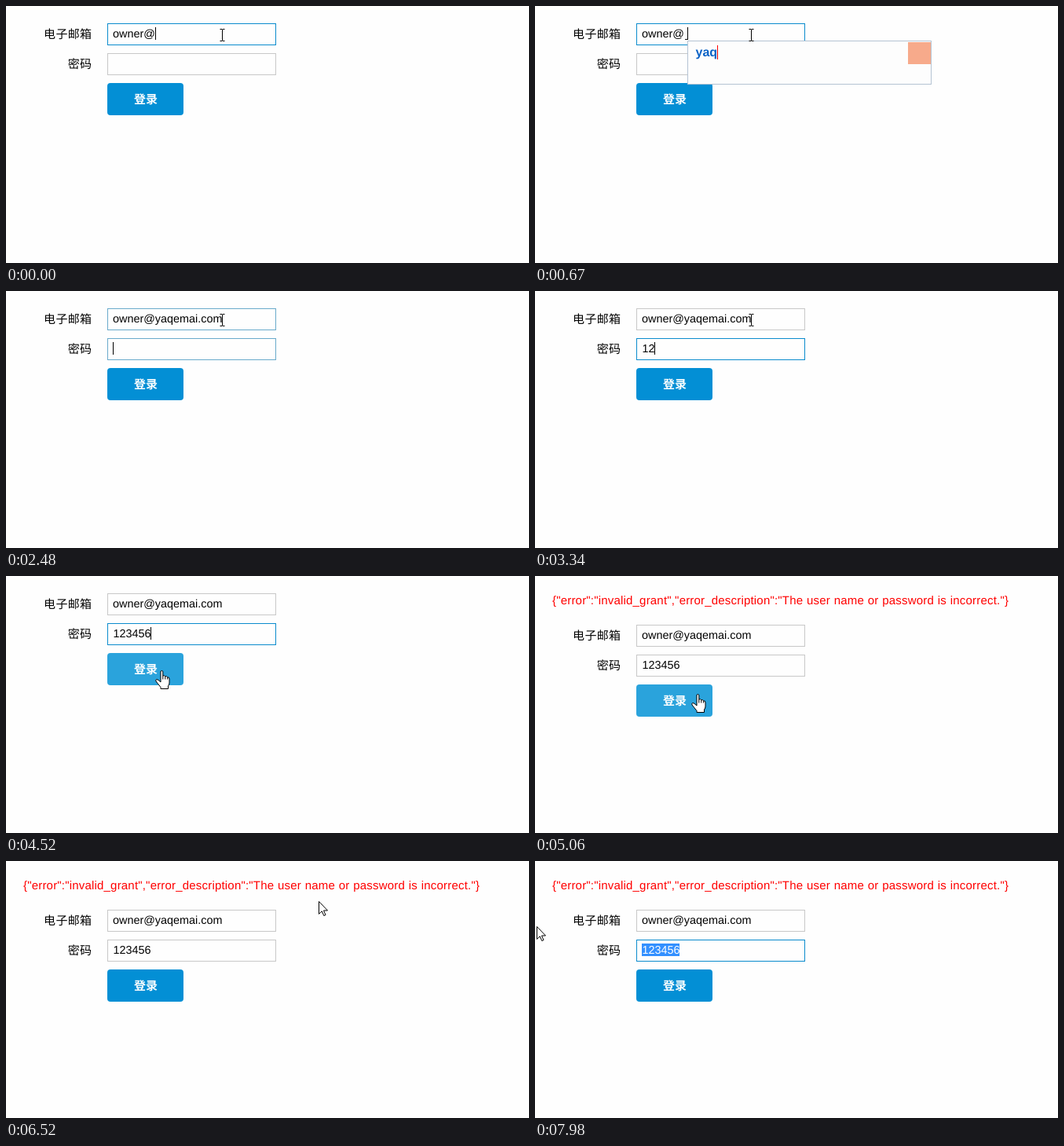
An HTML page that plays this animation: 666 by 327 pixels, repeating every 8000 ms.

```html
<!DOCTYPE html>
<html lang="zh-CN">
<head>
<meta charset="utf-8">
<title>登录</title>
<style>
html, body { margin: 0; width: 100%; height: 100%; overflow: hidden; background: #fefefe; }
svg { display: block; }
text {
  font-family: "Liberation Sans", Arial, sans-serif;
  font-kerning: none; text-rendering: geometricPrecision; white-space: pre;
}
.label { font: 15px "Noto Sans CJK SC", "Noto Sans CJK", sans-serif; letter-spacing: .3px; fill: #000; text-anchor: end; }
.value { font-size: 14.4px; fill: #000; }
.error { font-size: 15px; letter-spacing: .19px; word-spacing: .43px; fill: #f00; }
.typed { font-size: 16px; font-weight: bold; fill: #0a62c6; }
.submit { font: bold 15px "Noto Sans CJK SC", "Noto Sans CJK", sans-serif; fill: #fff; text-anchor: middle; }
.light { fill: #fff; }
.box { fill: #fefefe; stroke-width: 1; }
</style>
</head>
<body>
<svg width="666" height="327" viewBox="0 0 666 327">
  <defs>
    <clipPath id="picked"><rect id="pickClip" y="0" height="60" width="1"/></clipPath>
  </defs>
  <g id="error">
    <text class="error" x="22" y="36"></text>
    <rect id="errorSel" y="22" height="17" fill="#3390ff"/>
    <text class="error light" x="22" y="36" clip-path="url(#picked)"></text>
  </g>
  <g id="form">
    <text class="label" x="109.3" y="40.5">电子邮箱</text>
    <text class="label" x="109.3" y="78.5">密码</text>
    <rect id="mailBox" class="box" x="129.5" y="22.5" width="214" height="27"/>
    <rect id="passBox" class="box" x="129.5" y="60.5" width="214" height="27"/>
    <rect id="passSel" x="136" y="65" height="16" fill="#3390ff"/>
    <text id="mail" class="value" x="136" y="40"></text>
    <text id="pass" class="value" x="136.5" y="78"></text>
    <path id="dash" d="M191 42.5h4" stroke="#111"/>
    <rect id="caret" width="1" height="16" fill="#000"/>
    <rect id="button" x="129" y="98" width="97" height="41" rx="4"/>
    <text class="submit" x="178" y="124">登录</text>
  </g>
  <g id="popup">
    <rect x="194.5" y="44.5" width="310" height="55" fill="#fdfdfd" stroke="#b4c3d3"/>
    <rect x="475" y="46" width="29" height="28" fill="#f7aa8b"/>
    <text id="typed" class="typed" x="204.5" y="64"></text>
    <rect id="popCaret" y="50" width="1" height="18" fill="#f00"/>
  </g>
  <g id="mouse">
    <path id="beam" d="M-3 -7.5h2.5l.5 .5l.5-.5h2.5M0 -7V7M-3 7.5h2.5l.5-.5l.5 .5h2.5" fill="none" stroke="#000"/>
    <path id="arrow" d="M.5 .5V16.5L4.2 12.8L6.8 18.6L9 17.6L6.5 12H11.5Z" fill="#fff" stroke="#000"/>
    <g id="hand" stroke="#000">
      <path d="M0 2Q0 .5 1.4 .5Q2.8 .5 2.8 2V7Q5 6 5.8 7.8Q8 7 8.6 8.8Q11 8.4 11 11V16Q11 18 9.5 20V23.5H0V21.5L-6 14Q-7 12 -5 11.5Q-3.5 11.5 0 15Z" fill="#fff"/>
      <path d="M2.8 7V11.5M5.8 8V11.5M8.6 9V11.5" fill="none"/>
    </g>
  </g>
</svg>
<script>
const LOOP = 8000;
const USER = "owner@", HOST = "yaqemai.com", CODE = "123456";
const MESSAGE = '{"error":"invalid_grant","error_description":"The user name or password is incorrect."}';
const FIELD_EDGE = [200, 200, 200], FOCUS_EDGE = [10, 139, 205];
const BLUE = [3, 143, 213], HOVER = [42, 163, 220];

// [time, value...]: each row holds until the next one
const HOST_KEYS = [120, 400, 560, 710, 860, 1010, 1190, 1370, 1520, 2080, 2080];
const CODE_KEYS = [3340, 3340, 3610, 3730, 4010, 4130];
const MOUSE = [
  [0, 275, 37, "beam"], [4250, 258, 70, "beam"], [4400, 215, 104, "hand"], [4520, 197, 120, "hand"],
  [4790, 203, 165, "hand"], [4910, 206, 150, "hand"], [5210, 340, 112, "beam"],
  [5330, 520, 52, "arrow"], [5480, 612, 30, "arrow"], [5600, 430, 22, "beam"],
  [5720, 200, 20, "beam"], [5870, 100, 19, "beam"], [5990, 40, 19, "beam"],
  [6140, 26, 25, "beam"], [6290, 170, 33, "beam"], [6400, 320, 42, "arrow"],
  [6520, 398, 51, "arrow"], [6640, 385, 86, "arrow"], [6790, 335, 118, "beam"],
  [7070, 262, 136, "arrow"], [7220, 210, 144, "hand"], [7340, 195, 113, "beam"],
  [7460, 158, 112, "beam"], [7580, 118, 109, "arrow"], [7700, 70, 101, "arrow"],
  [7850, 26, 90, "arrow"], [7980, 2, 83, "arrow"]
];
const GLOW = [
  [0, 0], [4400, .6], [4520, 1], [5330, .88], [5480, .74], [5600, .62], [5720, .5], [5870, .3],
  [5990, 0], [7220, .4], [7340, .2], [7460, 0]
];

const el = {};
document.querySelectorAll("[id]").forEach(node => el[node.id] = node);
document.querySelectorAll(".error").forEach(node => node.textContent = MESSAGE);

const hold = (rows, t) => rows.filter(row => row[0] <= t).pop();
const count = (keys, t) => keys.filter(key => key <= t).length;
const within = (t, from, to) => t >= from && t < to;
const mix = (a, b, k) => `rgb(${a.map((v, i) => Math.round(v + (b[i] - v) * k))})`;
const show = (node, on) => node.setAttribute("display", on ? "inline" : "none");
const put = (node, attrs) => Object.entries(attrs).forEach(([k, v]) => node.setAttribute(k, v));

function drawMouse(t) {
  const [, x, y, kind] = hold(MOUSE, t);
  put(el.mouse, { transform: `translate(${x + (kind === "beam" ? .5 : 0)} ${y})` });
  for (const name of ["beam", "arrow", "hand"]) show(el[name], name === kind);
  return x;
}

function drawError(t, x) {
  const on = within(t, 5600, 6290);
  const left = t >= 6140 ? 22 : x + 1;
  show(el.error, t >= 4670);
  show(el.errorSel, on);
  put(el.errorSel, { x: left, width: 603 - left });
  put(el.pickClip, { x: on ? left : 700, width: 603 - left });
}

function drawCode(code, plain) {
  const span = document.createElementNS(el.pass.namespaceURI, "tspan");
  span.setAttribute("class", "light");
  span.textContent = code.slice(plain);
  el.pass.replaceChildren(code.slice(0, plain), span);
}

function drawFields(t, x) {
  const composing = within(t, 120, 2200);
  const inMail = t < 2480;
  const mailFocus = inMail ? 1 : t < 2630 ? .5 : 0;
  const passFocus = within(t, 2480, 4670) || t >= 7340 ? 1 - mailFocus : 0;
  const code = CODE.slice(0, count(CODE_KEYS, t));
  put(el.mailBox, { stroke: mix(FIELD_EDGE, FOCUS_EDGE, mailFocus) });
  put(el.passBox, { stroke: mix(FIELD_EDGE, FOCUS_EDGE, passFocus) });
  el.mail.textContent = USER + (t >= 2200 ? HOST : "");
  show(el.dash, composing);

  const caretX = !inMail ? 136 + 8 * code.length
    : composing ? 194 : t < 120 ? 190 : 275;
  put(el.caret, { x: caretX, y: inMail ? 27 : 65 });
  show(el.caret, inMail || within(t, 2480, 3060) || within(t, 3340, 4670) || within(t, 7340, 7460));

  const selected = t >= 7460;
  const plain = selected ? Math.max(0, Math.round((x - 136) / 8)) : code.length;
  drawCode(code, plain);
  put(el.passSel, { x: 136 + 8 * plain, width: 8 * (code.length - plain) });
  show(el.passSel, selected);
}

function drawPopup(t) {
  const open = within(t, 120, 2200);
  show(el.popup, open);
  if (!open) return;
  el.typed.textContent = HOST.slice(0, count(HOST_KEYS, t));
  put(el.popCaret, { x: Math.round(204.8 + el.typed.getComputedTextLength()) });
}

function draw(t) {
  const x = drawMouse(t);
  put(el.form, { transform: `translate(0 ${t >= 4670 ? 40 : 0})` });
  put(el.button, { fill: mix(BLUE, HOVER, hold(GLOW, t)[1]) });
  drawError(t, x);
  drawFields(t, x);
  drawPopup(t);
}

const start = performance.now();
function tick() {
  draw((performance.now() - start) % LOOP);
  requestAnimationFrame(tick);
}
draw(0);
requestAnimationFrame(tick);
</script>
</body>
</html>
```
